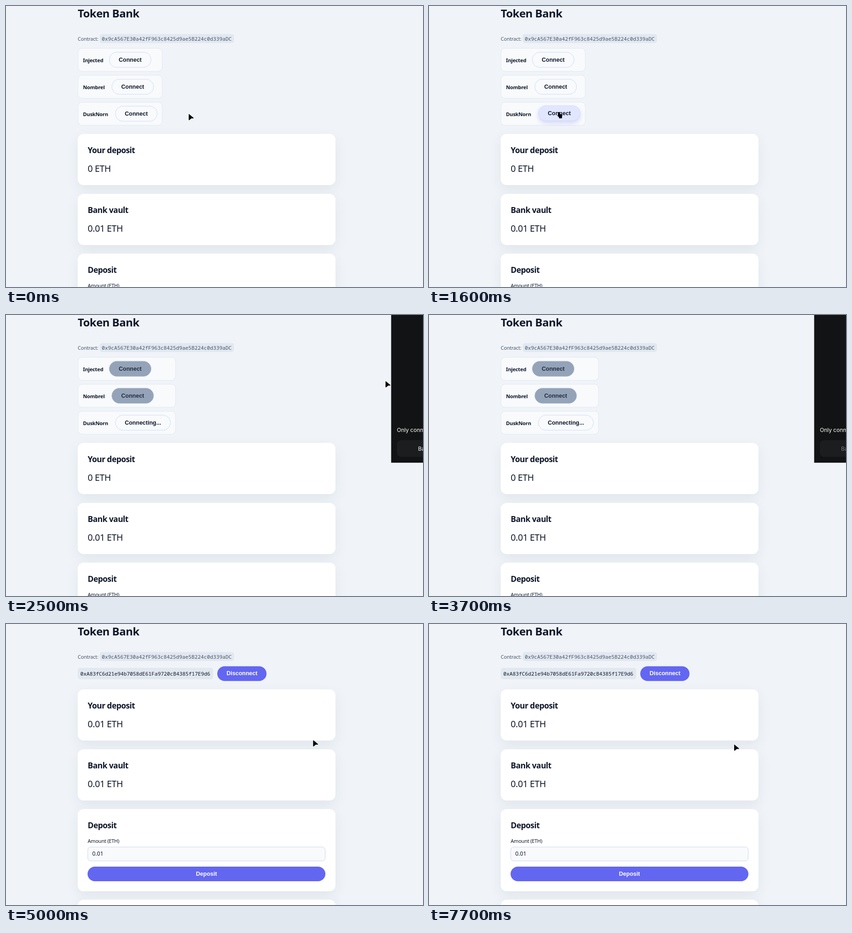
An HTML page that plays this animation: 910x615 px, repeating every 8 s.

```html
<!DOCTYPE html>
<html lang="en">
<head>
<meta charset="utf-8">
<title>Token Bank</title>
<style>
  html, body { margin: 0; width: 100%; height: 100%; overflow: hidden; background: #f0f4f9; }
  svg { display: block; width: 910px; height: 615px; }
  text { font-family: "Noto Sans", "Open Sans", sans-serif; fill: #0f172a; white-space: pre; }
  .h1 { font-size: 24px; font-weight: 700; letter-spacing: -.021em; }
  .h2 { font-size: 17.5px; font-weight: 700; letter-spacing: -.032em; }
  .value { font-size: 19.5px; font-weight: 500; letter-spacing: -.02em; }
  .small { font-size: 11px; letter-spacing: -.02em; }
  .muted { fill: #475569; }
  .label { font-size: 11.2px; font-weight: 700; letter-spacing: -.02em; }
  .field { font-size: 12.2px; }
  .mono { font: 11.26px "Noto Sans Mono", "DejaVu Sans Mono", monospace; }
  .btn { font: 700 12.5px "Liberation Sans", Arial, sans-serif; text-anchor: middle; }
  .light { fill: #fff; }
  .dark { font: 12px Inter, Roboto, sans-serif; fill: #fff; }
  .card { fill: #fff; filter: drop-shadow(0 9px 12px rgba(15, 23, 42, .065)); }
  .chip { fill: #e2e8f0; }
  .row { fill: #f8fafc; stroke: #e2e8f0; }
  .input { fill: #f8fafc; stroke: #cdd7ea; }
  .solid { fill: #6366f1; }
</style>
</head>
<body>
<svg id="stage" viewBox="0 0 910 615"></svg>
<script>
const LOOP = 8000, STEP = 100;
const CONNECTING = 1800, POPUP = 1900, POPUP_READY = 2200, APPROVED = 3700;
const CONNECTED = 3800, LOADED = 4200, POPUP_END = 5000;
const stage = document.getElementById('stage');

const clamp = v => Math.max(0, Math.min(1, v));
const mix = (a, b, k) => a + (b - a) * k;

function add(parent, tag, attrs = {}, content) {
  const el = document.createElementNS('http://www.w3.org/2000/svg', tag);
  set(el, attrs);
  if (content !== undefined) el.textContent = content;
  parent.appendChild(el);
  return el;
}
function set(el, attrs) {
  for (const key in attrs) el.setAttribute(key, attrs[key]);
}
const show = (el, on) => set(el, { display: on ? 'inline' : 'none' });
const group = parent => add(parent, 'g');
const rect = (parent, cls, x, y, width, height, rx) =>
  add(parent, 'rect', { class: cls, x, y, width, height, rx });
const text = (parent, cls, x, y, content) =>
  add(parent, 'text', { class: cls, x, y }, content);

// Header
text(stage, 'h1', 156.5, 25, 'Token Bank');
text(stage, 'small muted', 156.5, 76, 'Contract:');
rect(stage, 'chip', 204.5, 61.5, 293, 19.5, 5);
text(stage, 'mono muted', 209, 76, '0x9cA567E30a42fF963c8425d9ae5B224c0d339aDC');

// Cards, placed relative to the first one
const cards = group(stage);
function card(y, height, title) {
  rect(cards, 'card', 156.5, y, 562.5, height, 13);
  text(cards, 'h2', 178.3, y + 42, title);
}
card(0, 112, 'Your deposit');
card(131.3, 112, 'Bank vault');
card(262, 180, 'Deposit');
card(460.5, 180, 'Withdraw');
const balance = text(cards, 'value', 178.3, 83, '');
text(cards, 'value', 178.3, 214.3, '0.01 ETH');
text(cards, 'small', 178.3, 336, 'Amount (ETH)');
rect(cards, 'input', 178.5, 345, 518, 30.5, 6.5);
text(cards, 'field', 188.3, 364, '0.01');
rect(cards, 'solid', 178, 388, 519, 32, 16);
text(cards, 'btn light', 437.5, 408.3, 'Deposit');

// Wallet list
const wallets = group(stage);
function wallet(index, name, x, on, off, chosen) {
  const y = 92.5 + index * 59;
  const row = rect(wallets, 'row', 157, y, 184, 50.5, 9);
  text(wallets, 'label', 168, y + 30.2, name);
  const button = group(wallets);
  const face = rect(button, '', x, y + 8.7, 91, 33, 16.5);
  const caption = text(button, 'btn', x + 45.5, y + 29.4, 'Connect');
  return { row, button, face, caption, x, on, off, chosen };
}
const list = [
  wallet(0, 'Injected', 225.5, 850, 1000),
  wallet(1, 'Nombrel', 231, 950, 1100),
  wallet(2, 'DuskNorn', 238.8, 1400, 2080, true)
];

function drawWallet(w, t) {
  const busy = t >= CONNECTING;
  const hover = Math.min(clamp((t - w.on) / 200), clamp(1 - (t - w.off) / 200));
  const width = busy && w.chosen ? 120 : 91;
  const disabled = busy && !w.chosen;
  const tint = `rgb(${mix(248, 224, hover ** 2)},${mix(250, 231, hover ** 2)},${mix(252, 255, hover ** 2)})`;
  set(w.row, { width: busy ? 213 : 184 });
  set(w.face, {
    width,
    fill: disabled ? '#94a3b8' : tint,
    stroke: disabled ? '#a6b4d4' : '#d0d9fa'
  });
  w.face.style.filter = hover && !disabled
    ? `drop-shadow(0 ${5 * hover}px 5px rgba(99,102,241,${.22 * hover}))` : 'none';
  set(w.caption, { x: w.x + width / 2, 'fill-opacity': disabled ? .85 : 1 });
  w.caption.textContent = busy && w.chosen ? 'Connecting...' : 'Connect';
  set(w.button, { transform: `translate(0 ${-hover})` });
}

// Connected account
const account = group(stage);
rect(account, 'chip', 156.5, 96, 295.5, 25, 5);
text(account, 'mono', 162.3, 112.5, '0xA83fC6d21e94b7058dE61Fa9720cB4385f17E9d6');
rect(account, 'solid', 461, 92.5, 107.5, 32.3, 16.2);
text(account, 'btn light', 515, 112.4, 'Disconnect');

// Popup, cut by the right edge
const popup = group(stage);
add(popup, 'rect', { x: 840.5, width: 90, height: 323.3, fill: '#121314' });
const prompt = group(popup);
text(prompt, 'dark', 853, 256, 'Only connect with');
add(prompt, 'rect', { x: 853, y: 274, width: 120, height: 36.5, rx: 9, fill: '#1c1d1f' });
const back = text(prompt, 'dark', 899.3, 296.5, 'Back');

// Pointer
const pointer = group(stage);
const arrow = add(pointer, 'path', {
  d: 'M.3 .3Q.6-.2 1.2.3L10.8 8.2Q11.3 9.4 10 9.4L6 9.6L1.6 13.2Q.2 13.8.2 12.3Z'
});
const hand = add(pointer, 'path', {
  d: 'M2.2 1.2Q3.4-.4 4.6 1.2V4.6L9.8 5.8Q11 6.2 11 7.6L10.2 11.3V14.2H3.8V12.2L.3 8.8Q-.2 7.2 1.2 7.2L2.2 8Z'
});
const track = [
  [200, 398.5, 236.5], [300, 395, 215], [400, 386, 165], [500, 370, 105],
  [600, 347, 58], [700, 322, 42], [800, 302, 62], [900, 287, 105],
  [1000, 280, 145], [1100, 278, 176], [1200, 279.3, 205], [1300, 280.5, 221],
  [1400, 280.3, 230], [1500, 280, 231.5], [2000, 280, 231.5], [2100, 325, 236],
  [2200, 440, 228], [2300, 600, 200], [2400, 745, 168], [2500, 828, 145],
  [2600, 858, 133.5], [3900, 858, 238], [4000, 752, 250], [4100, 692, 254],
  [4200, 670, 254], [4300, 670, 254], [4400, 670, 254.5], [7500, 670, 254.5],
  [7600, 668, 259], [7700, 665.7, 264]
];

function position(t) {
  const next = track.findIndex(p => p[0] > t);
  if (next < 0) return track[track.length - 1].slice(1);
  if (next === 0) return track[0].slice(1);
  const a = track[next - 1], b = track[next];
  const k = (t - a[0]) / (b[0] - a[0]);
  return [mix(a[1], b[1], k), mix(a[2], b[2], k)];
}

function drawPointer(t) {
  const [x, y] = position(t);
  const overButton = (t >= 900 && t < 1200) || (t >= 1400 && t < 2200) || t === 2600;
  show(pointer, t < 2700 || t >= 3900);
  show(hand, overButton);
  show(arrow, !overButton);
  set(pointer, { transform: `translate(${x} ${y})` });
}

function draw(time) {
  const t = Math.floor(time % LOOP / STEP) * STEP;
  const connected = t >= CONNECTED;
  show(wallets, !connected);
  show(account, connected);
  set(cards, { transform: `translate(0 ${connected ? 143 : 280})` });
  balance.textContent = !connected ? '0 ETH' : t < LOADED ? 'Loading...' : '0.01 ETH';
  list.forEach(w => drawWallet(w, t));
  show(popup, t >= POPUP && t < POPUP_END);
  show(prompt, t >= POPUP_READY);
  back.style.fill = t >= APPROVED ? '#77797c' : '#fff';
  drawPointer(t);
}

const start = performance.now();
function tick() {
  draw(performance.now() - start);
  requestAnimationFrame(tick);
}
tick();
</script>
</body>
</html>
```
